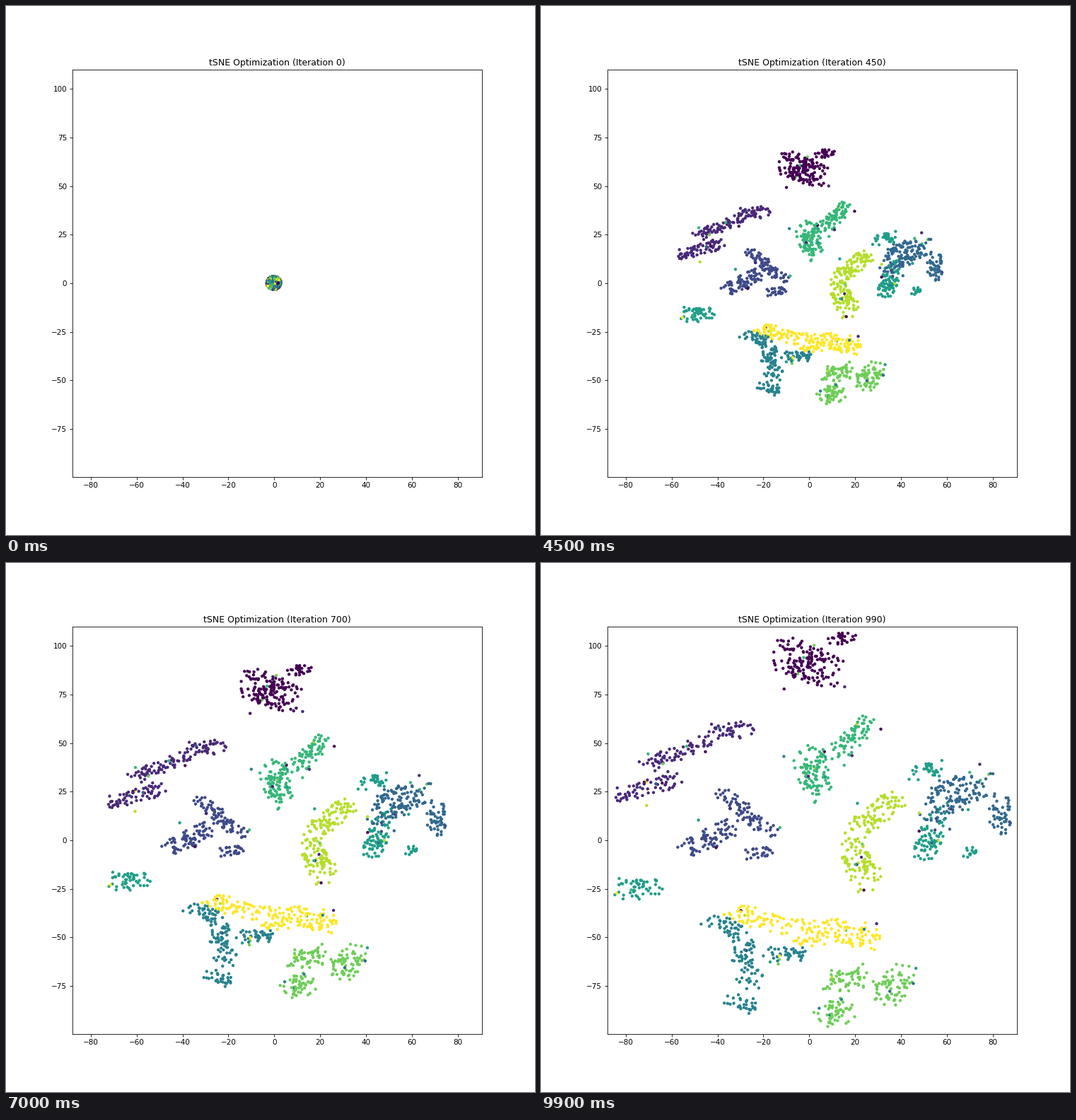
Animation of 748x748 px, one loop 10000 ms. Source, as a matplotlib script:

```python
import numpy as np
import matplotlib.pyplot as plt
from matplotlib.animation import FuncAnimation

FRAMES, STEP, PER_CLASS = 100, 10, 180
LAST, PIVOT = 990, 290
rng = np.random.default_rng(7)

# Final islands of each class: capsules as x0, y0, x1, y1, radius.
ISLANDS = [
    [(-9, 95, 6, 88, 9), (10, 103, 19, 105, 3)],
    [(-83, 23, -58, 31, 3.8), (-70, 39, -45, 50, 4), (-41, 56, -28, 57, 4)],
    [(-53, -4, -35, 6, 5), (-38, 24, -17, 4, 4), (-27, -7, -17, -6, 3)],
    [(55, 18, 73, 29, 8), (83, 20, 84, 6, 5)],
    [(-44, -42, -34, -45, 4), (-31, -50, -26, -70, 6),
     (-34, -81, -24, -86, 4), (-18, -60, -3, -58, 4.5)],
    [(46, 34, 56, 37, 4), (50, -7, 55, 10, 6), (68, -6, 72, -7, 3),
     (-81, -25, -68, -25, 5)],
    [(0, 44, 3, 28, 7.5), (12, 44, 25, 60, 5)],
    [(8, -91, 16, -86, 7), (10, -73, 23, -70, 6), (33, -80, 41, -70, 7)],
    [(20, -7, 25, -19, 7), (21, 6, 37, 20, 5.5)],
    [(-33, -37, -12, -44, 5), (-5, -46, 27, -50, 7)],
]


def disc(n, r):
    a = rng.uniform(0, 2 * np.pi, n)
    d = r * np.sqrt(rng.random(n))
    return np.column_stack([d * np.cos(a), 1.1 * d * np.sin(a)])


def capsule(p, q, r, n):
    """Random points on a thick line, spread evenly over its area."""
    axis = q - p
    pad = r / (np.hypot(*axis) + r)
    u = rng.uniform(-pad / 3, 1 + pad / 3, n)
    return p + u[:, None] * axis + disc(n, r)


def build():
    pts, mids, labels = [], [], []
    for label, caps in enumerate(ISLANDS):
        caps = np.array(caps, float)
        length = np.hypot(*(caps[:, 2:4] - caps[:, :2]).T)
        r = caps[:, 4]
        area = 2 * r * length + np.pi * r ** 2
        counts = np.round(PER_CLASS * area / area.sum()).astype(int)
        for cap, n in zip(caps, counts):
            p, q = cap[:2], cap[2:4]
            pts.append(capsule(p, q, cap[4], n))
            mids.append(np.tile((p + q) / 2, (n, 1)))
            labels += [label] * n
    order = rng.permutation(len(labels))
    return np.vstack(pts)[order], np.vstack(mids)[order], np.array(labels)[order]


late, mids, labels = build()

# A few samples drift out of their island or land in a wrong one.
stray = rng.random(len(late)) < .045
late[stray] += rng.normal(0, 4, (stray.sum(), 2))
labels[stray] = rng.integers(0, 10, stray.sum())

# At the pivot the islands sit closer together, slightly sheared.
shear = np.array([[.475, -.04], [0, .445]])
early = mids @ shear.T + .53 * (late - mids)
ball = disc(len(late), 3.1) + (-.2, .2)


def spread(it):
    """Overall size of the layout; grows with the log of the iteration."""
    return .1 * np.logaddexp(.3, 10 + 4.3 * np.log(max(it, 1) / LAST))


def layout(it):
    s, pivot = spread(it), spread(PIVOT)
    if s < pivot:
        pos = early * s / pivot
    else:
        pos = early + (late - early) * (s - pivot) / (spread(LAST) - pivot)
    mix = np.exp(-(it / 35) ** 2)
    return mix * ball + (1 - mix) * pos


fig, ax = plt.subplots(figsize=(10, 10), dpi=74.8)
ax.set_xlim(-88.2, 90.7)
ax.set_ylim(-99.6, 110.05)
cloud = ax.scatter(*layout(0).T, c=labels, cmap="viridis", s=10, vmin=0, vmax=9)
title = ax.set_title("tSNE Optimization (Iteration 0)")


def update(i):
    it = STEP * i
    cloud.set_offsets(layout(it))
    title.set_text(f"tSNE Optimization (Iteration {it})")
    return cloud, title


anim = FuncAnimation(fig, update, frames=FRAMES, interval=100, repeat=True,
                     repeat_delay=0)
plt.show()
```
